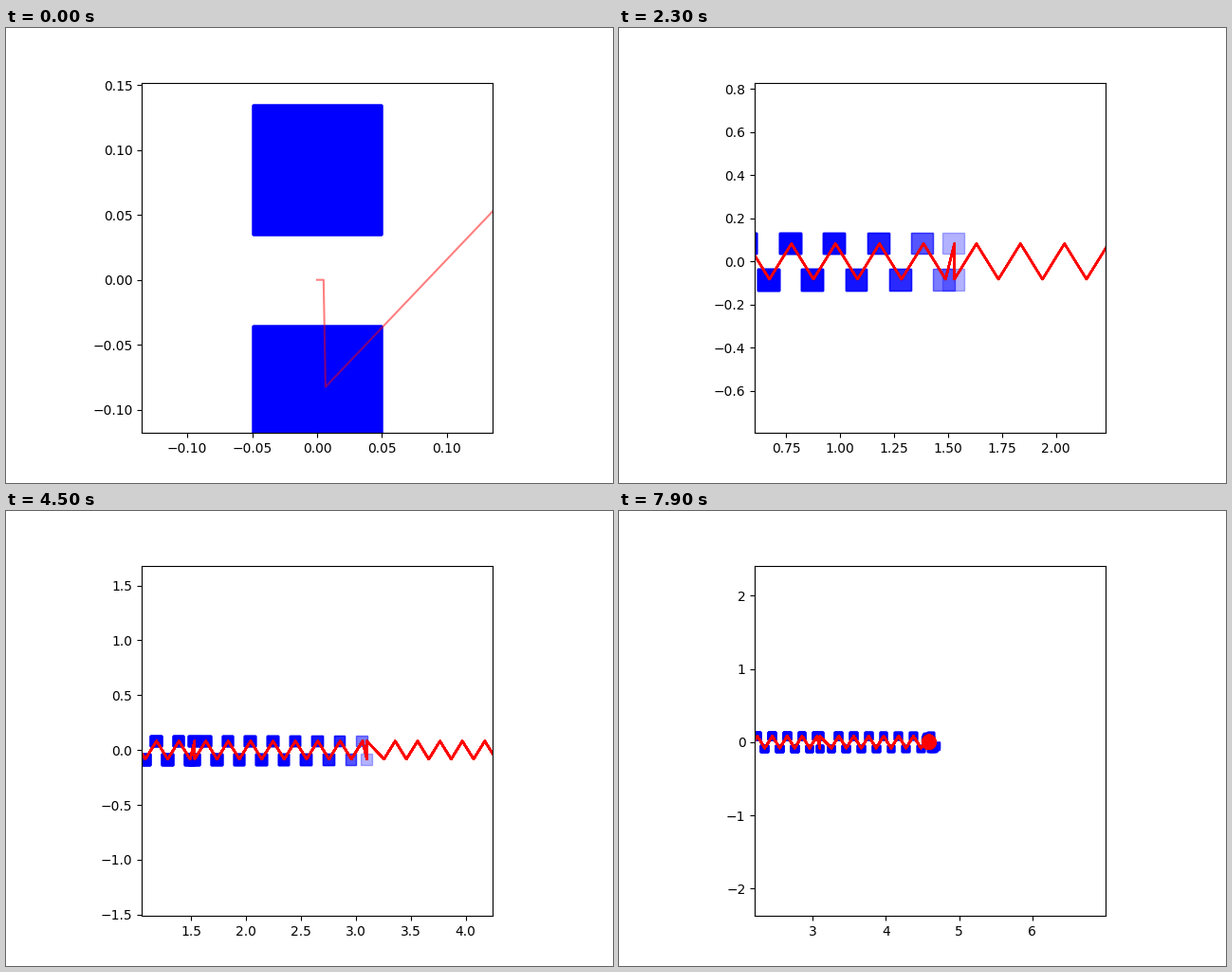
Recreate the animation shown at these times as a matplotlib script. Size 640x480 px, loop 8000 ms.

```python
import numpy as np
import matplotlib.pyplot as plt
from matplotlib.animation import FuncAnimation
from matplotlib.collections import PolyCollection

FRAMES = 80
STEPS = 98
SIDE = 0.1          # foot size
HALF_GAP = 0.085    # lateral offset of a foot
STRIDE = 0.102
BEAT = 1.375        # frames per step
TURN_X, TURN_RATE = 4.61, 0.13
# each leg of the walk: first step, its x, length of the first stride
LEGS = [(1, 0.0, 0.157), (17, 1.524, STRIDE), (34, 3.093, 0.156), (48, TURN_X, 0.0)]
TURN_STEP = LEGS[-1][0]


def leg_of(k):
    """Index of the leg that step k belongs to."""
    return max([n for n, leg in enumerate(LEGS) if leg[0] <= k], default=0)


def foot(k):
    """Centre of footstep k; even steps are left, odd ones right."""
    side = HALF_GAP if k % 2 == 0 else -HALF_GAP
    if k >= TURN_STEP:
        a = TURN_RATE * (k - TURN_STEP)
        return TURN_X - side * np.sin(a), side * np.cos(a)
    n = leg_of(k)
    start, x, first = LEGS[n]
    if k > start:
        x = min(x + first + STRIDE * (k - start - 1), LEGS[n + 1][1])
    return x, side


def plan_point(k):
    """Planned pressure point belonging to footstep k."""
    x, y = foot(k)
    if k >= TURN_STEP:
        return x - 0.02, y * 1.08
    return x + 0.0065, y * 0.971


def camera(k):
    """Mean of five recent feet: lefts only once the gait is steady."""
    leg = leg_of(k)
    steady = leg < len(LEGS) - 1 and k - LEGS[leg][0] > 6
    newest = [] if steady else [k, k - 1, k - 2]
    left = (k if steady else k - 3) // 2 * 2
    trail = newest + [left - 2 * j for j in range(5 - len(newest))]
    return np.mean([foot(j) for j in trail], axis=0)


steps = np.arange(STEPS)
feet = np.array([foot(k) for k in steps])
plan = np.array([(0, 0), (0.005, 0)] + [plan_point(k) for k in steps[1:]])

# the feet close together in a single beat at the first stop
landing = np.ceil(BEAT * (steps - (steps >= LEGS[1][0])) + 0.95).astype(int)
landing[:2] = -20   # already standing

square = np.array([(-1, -1), (1, -1), (1, 1), (-1, 1)]) * SIDE / 2

fig, ax = plt.subplots(figsize=(6.4, 4.8), dpi=100)
ax.set_aspect("equal")
boxes = PolyCollection([], facecolor=(0, 0, 1, 0.3), edgecolor=(0, 0, 1, 0.3),
                       linewidth=1, joinstyle="miter", zorder=1)
ax.add_collection(boxes, autolim=False)
lines = [ax.plot(*plan.T, color="red", alpha=0.5)[0] for _ in range(FRAMES)]


def draw(i):
    k = int(np.sum(landing <= i)) - 1
    # every frame paints all feet and the plan again, so the colour builds up
    copies = np.minimum(i + 1 - landing[:k + 1], 40)
    centres = np.repeat(feet[:k + 1], copies, axis=0)
    boxes.set_verts(centres[:, None, :] + square)
    for n, line in enumerate(lines):
        line.set_visible(n <= i)

    half = max(2 * HALF_GAP + SIDE, feet[:k + 1, 0].max() + SIDE) / 2
    cx, cy = camera(k)
    ax.set_xlim(cx - half, cx + half)
    ax.set_ylim(cy - half, cy + half)
    return [boxes, *lines]


anim = FuncAnimation(fig, draw, frames=FRAMES, interval=100, repeat=True,
                     repeat_delay=0, blit=False)
plt.show()
```
